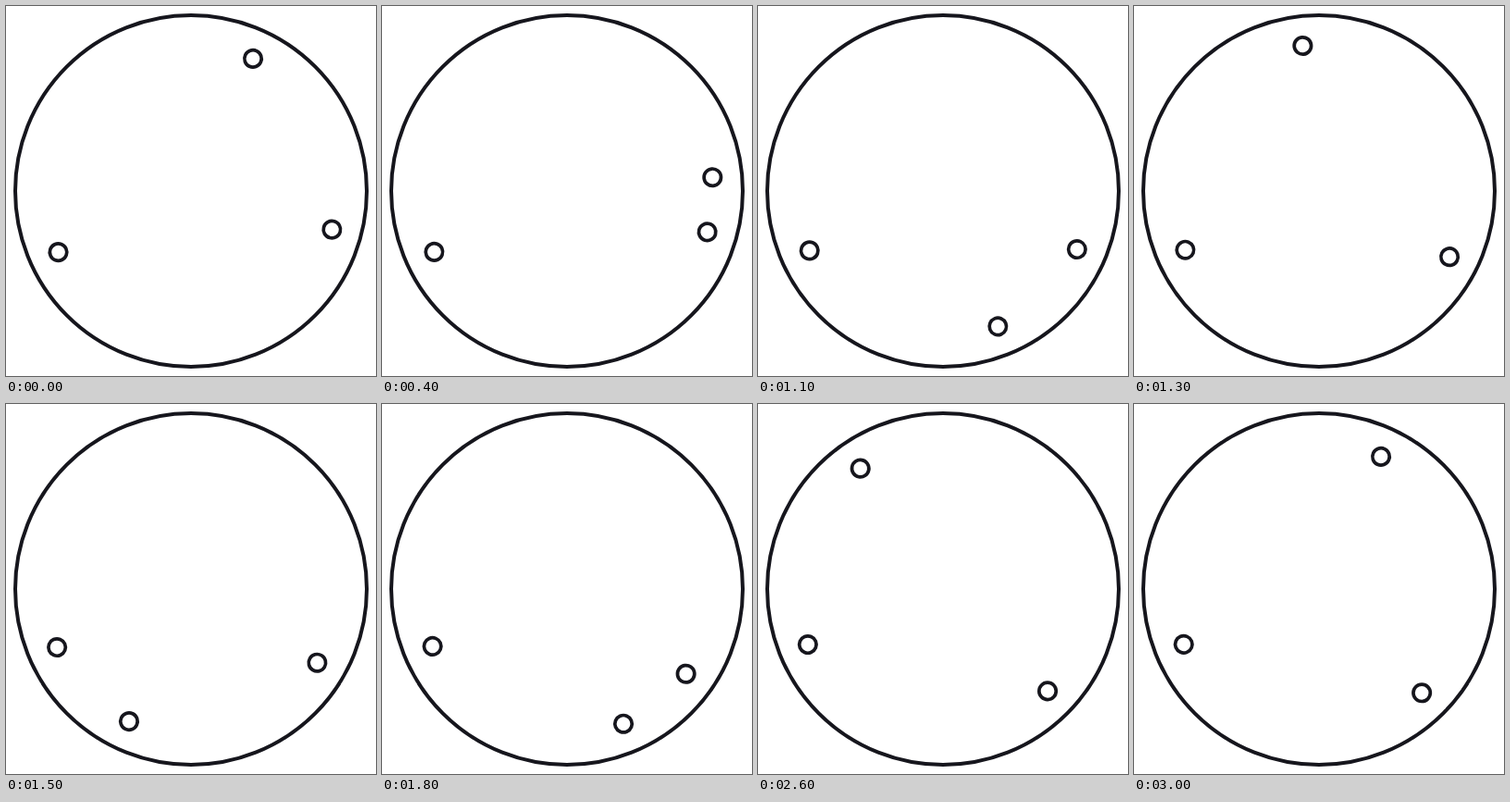
Recreate the animation shown at these times as an HTML page. Size 400 px wide and 400 px high, loop 3100 ms.

```html
<!DOCTYPE html>
<html lang="en">
<head>
<meta charset="utf-8">
<title>Clock dots</title>
<style>
  html, body { margin: 0; width: 100%; height: 100%; overflow: hidden; background: #fff; }
  svg { display: block; width: 100%; height: 100%; }
  circle { fill: none; stroke: #16161d; stroke-width: 4; }
  .hand { stroke-width: 3.7; }
</style>
</head>
<body>
<svg viewBox="0 0 400 400">
  <circle cx="200" cy="200" r="190"/>
  <circle class="hand" cx="200" cy="42" r="9.2"/>
  <circle class="hand" cx="200" cy="42" r="9.2"/>
  <circle class="hand" cx="200" cy="42" r="9.2"/>
</svg>
<script>
const STEP = 100, STEPS = 30;
// Hour, minute and second: start angle and sweep in degrees, clockwise from the top.
const motion = [[245.25, 2.5], [105.3, 30], [25.1, 1800]];
const hands = document.querySelectorAll('.hand');

// cubic-bezier(.44, 0, .56, 1), solved by bisection
function ease(x) {
  let lo = 0, hi = 1;
  for (let i = 0; i < 30; i++) {
    const s = (lo + hi) / 2;
    if (1.32 * s - 0.96 * s * s + 0.64 * s ** 3 < x) lo = s; else hi = s;
  }
  return lo * lo * (3 - 2 * lo);
}

function draw() {
  const step = Math.floor(performance.now() / STEP) % (STEPS + 1);
  const progress = ease(step / STEPS);
  motion.forEach(([start, sweep], i) =>
    hands[i].setAttribute('transform', `rotate(${start + sweep * progress} 200 200)`));
  requestAnimationFrame(draw);
}
draw();
</script>
</body>
</html>
```
